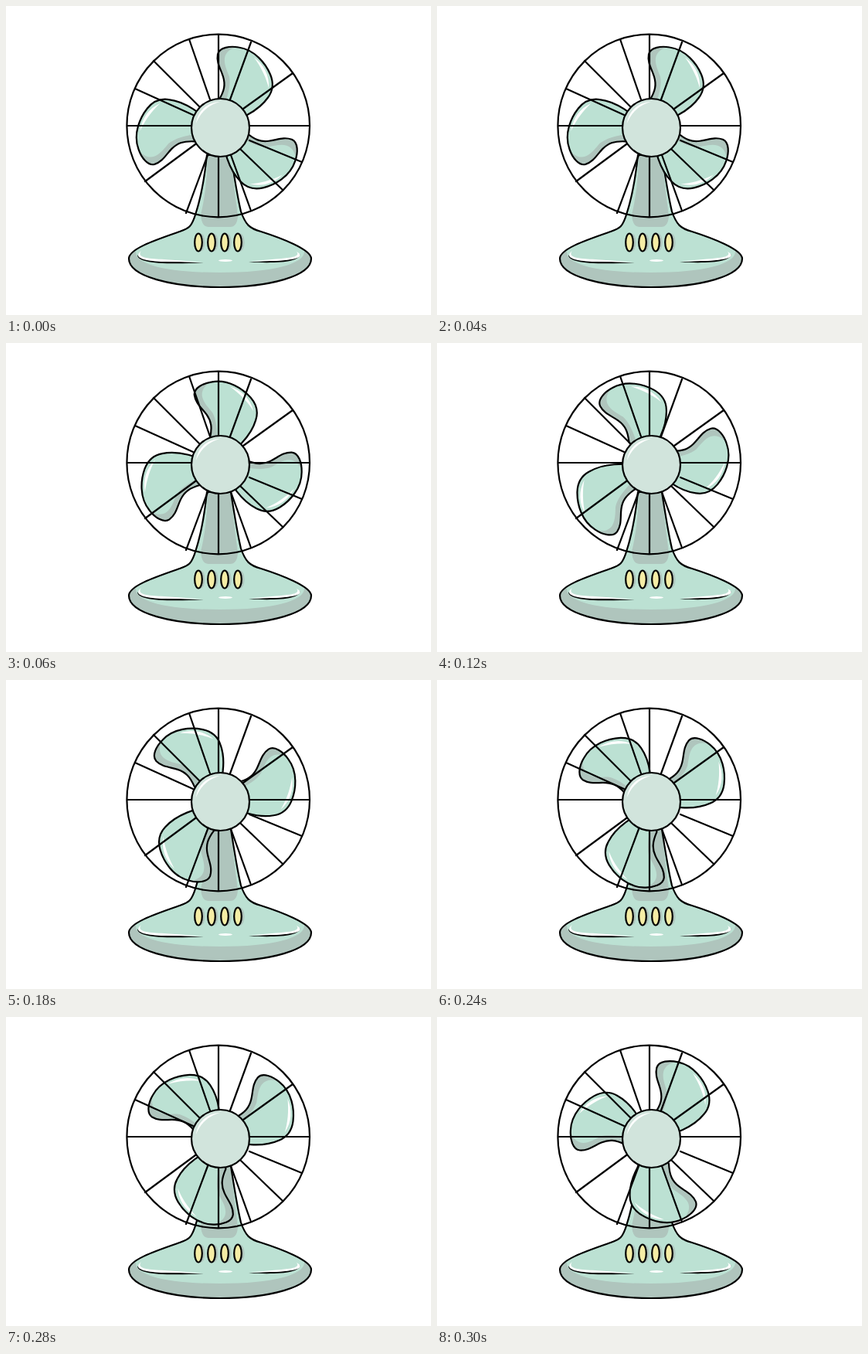
These frames come from a looping animation (550 by 400 pixels, 360 ms). An HTML page:

```html
<!DOCTYPE html>
<html lang="en">
<head>
<meta charset="utf-8">
<title>Desk fan</title>
<style>
html, body { margin: 0; width: 100%; height: 100%; overflow: hidden; background: #fff; }
svg { display: block; width: 100%; height: 100%; }
.line { fill: none; stroke: #000; stroke-width: 2.2; stroke-linecap: round; stroke-linejoin: round; }
.light { fill: #bce1d3; }
.dark { fill: #afc5bd; }
.shine { fill: #fff; }
</style>
</head>
<body>
<svg viewBox="0 0 550 400">
  <defs>
    <path id="body" d="M260 193C257 222 252 248 246 267C240 288 236 288 222 293C190 304 159 315 159 327C159 350 215 364 277 364C340 364 395 350 395 327C395 315 355 300 330 292C315 288 310 283 304 266C299 245 295 218 291 193Z"/>
    <clipPath id="inBody"><use href="#body"/></clipPath>
    <path id="vane" d="M275 121C283 108 284 100 281 90C278 80 272 72 274 61C276 52 290 50 301 52C322 55 336 73 342 87C347 99 345 109 339 117C332 127 324 133 313 139L277 157Z"/>
    <g id="blade">
      <use href="#vane" class="light"/>
      <path class="dark" d="M275 121C283 108 284 100 281 90C278 80 272 72 274 61C276 52 290 50 301 52C292 52 284 58 283 66C282 74 286 82 289 90C291 100 288 112 282 130Z"/>
      <path class="shine" d="M321 65C334 75 341 88 340 105C337 92 331 79 321 65Z"/>
      <use href="#vane" class="line"/>
    </g>
  </defs>

  <use href="#body" class="light"/>
  <path class="dark" d="M261 193H291C295 235 298 255 300 272Q299 286 290 286H262Q253 286 252 270C258 245 260 225 261 193Z"/>
  <path class="dark" clip-path="url(#inBody)" d="M155 318H168C168 334 205 345 277 345C345 345 386 334 386 318H400V370H155Z"/>
  <use href="#body" class="line"/>
  <path d="M170 322C174 331 195 329 256 332.5C195 335 170 332 170 322ZM381 321C378 330 355 329 314 331.5C355 333.5 380 331 381 321Z"/>
  <path class="shine" d="M175 317C169 325 180 327 205 328L254 331.5L205 331C172 330 166 324 175 317ZM376 318C381 324 372 326 350 327.5L316 330.5L350 330C379 328 387 324 376 318Z"/>
  <ellipse class="shine" cx="284" cy="329.5" rx="9" ry="1.5"/>
  <g id="buttons"></g>

  <g id="rotor">
    <use href="#blade"/>
    <use href="#blade" transform="rotate(-118.5)"/>
    <use href="#blade" transform="rotate(99.8)"/>
  </g>

  <circle class="line" cx="274.7" cy="155" r="118.3"/>
  <path class="line" d="M275 37V121M275 194V273M157 155H241M314 155H393M237 43L264 121M191 71L250 130M167 107L242 141M317 47L290 121M371 87L307 133M315 174L383 202M304 186L358 238M291 193L317 265M261 193L233 268M245 179L180 227"/>
  <circle cx="277.5" cy="157.5" r="37.5" fill="#d1e4dc"/>
  <path class="shine" d="M246 152C248 136 260 125 277 124C262 128 251 138 246 152Z"/>
  <circle class="line" cx="277.5" cy="157.5" r="37.5"/>
</svg>
<script>
const STEP = 60;
// The rotor wobbles on its axle: [turn, x, y] of each pose.
const poses = [
  [0, 275.5, 158], [18.5, 275.5, 157.5], [37.5, 270.5, 156.5],
  [55, 273.5, 158.5], [69.5, 279, 161.5], [96, 279.5, 161]
];
const rotor = document.getElementById("rotor");

for (const use of rotor.children) {
  const turn = use.getAttribute("transform") || "";
  use.setAttribute("transform", turn + " translate(-275.5 -156.5)");
}

document.getElementById("buttons").innerHTML = [249, 266, 283, 300].map(x =>
  `<ellipse class="dark" cx="${x + 3}" cy="306" rx="5.5" ry="11.5"/>
   <ellipse class="line" cx="${x}" cy="306" rx="4.8" ry="11.5" style="fill:#f5eda5"/>`).join("");

function draw() {
  const i = Math.floor(performance.now() / STEP) % poses.length;
  const [turn, x, y] = poses[i];
  rotor.setAttribute("transform", `translate(${x} ${y}) rotate(${-turn})`);
  requestAnimationFrame(draw);
}
draw();
</script>
</body>
</html>
```
